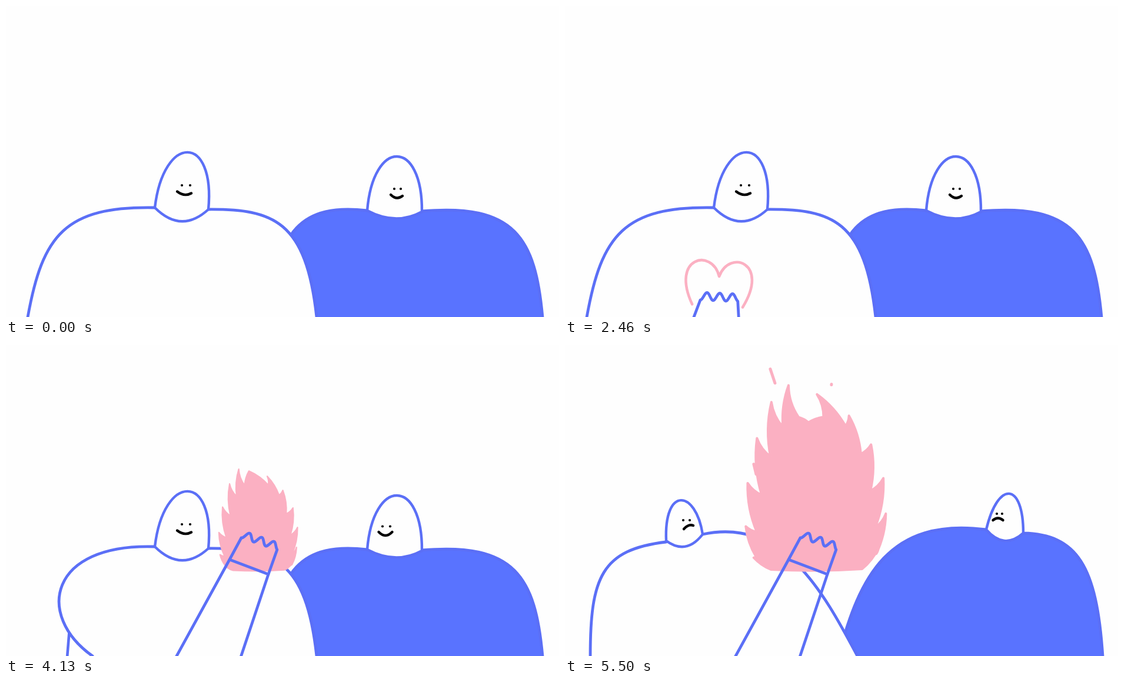
An HTML page with a canvas for the animation above (5540 ms loop, 940 by 529 pixels).

```html
<!DOCTYPE html>
<html lang="en">
<head>
<meta charset="utf-8">
<title>Heart on fire</title>
<style>
html, body { margin: 0; width: 100%; height: 100%; overflow: hidden; background: #fefefe; }
canvas { display: block; }
</style>
</head>
<body>
<canvas id="stage" width="940" height="529"></canvas>
<script>
const ctx = document.getElementById('stage').getContext('2d');
const LOOP = 5540, BLUE = '#5973ff', INK = '#5b6ff6', PINK = '#fbb0c2', WHITE = '#fefefe';

// body: two cubics, one per shoulder
// head: dome cubic from neck to neck, then the chin control point
// face: eyes x, y, half gap; mouth x, y, half width, slope, bend
const left = {
  rest: {
    body: [37,529, 62,390, 100,340, 253,343, 343,346, 455,345, 510,365, 528,529],
    head: [253,343, 268,217, 356,217, 344,346, 298,388],
    face: [306,305, 7, 303,317, 12, 1.5, 8]
  },
  recoil: {
    body: [50,529, 48,400, 58,355, 178,337, 241,326, 375,295, 440,420, 500,529],
    head: [178,336, 175,240, 230,246, 241,327, 212,360],
    face: [213.5,300.5, 5.5, 218,310, 8, -2, 4]
  },
  sad: {
    body: [43,529, 43,395, 62,348, 172,335, 234,322, 370,293, 438,418, 497,529],
    head: [172,333, 168,240, 222,246, 234,322, 206,358],
    face: [206.5,298, 5.5, 210,310, 8, -3, -6]
  }
};
const right = {
  rest: {
    body: [455,529, 455,380, 505,335, 614,348, 707,349, 865,335, 900,395, 912,529],
    head: [614,348, 624,225, 708,225, 707,350, 663,374],
    face: [665.5,311, 5.5, 664,322, 10, 1, 9]
  },
  recoil: {
    body: [465,529, 500,400, 545,305, 703,320, 770,321, 865,322, 900,370, 912,529],
    head: [703,318, 718,229, 767,230, 770,320, 737,345],
    face: [725.5,289, 5.5, 722.5,299.5, 9.5, 0.5, 0]
  },
  sad: {
    body: [465,529, 500,395, 550,292, 716,314, 779,320, 870,322, 904,375, 914,529],
    head: [716,314, 736,230, 779,233, 779,320, 746,349],
    face: [738.5,287, 4.5, 736,298, 8.5, 0, -7]
  }
};
const lookLeft = [646.5,308.5, 6.5, 645,318, 11.5, 0, 12];
const restOf = left.rest.body.slice(6);
const reaching = [62,529, 82,410, 130,358, ...restOf];
const offering = [147,529, 50,460, 72,337, ...restOf];

// Base, wrist and palm on the left, the same on the right in reverse, finger height
const arm = {
  grip: [195,640, 213,545, 230,500, 295,503, 296,545, 302,640, 13],
  inside: [200,640, 216,533, 240,455, 306,456, 298,533, 300,640, 6],
  offer: [284,540, 380,365, 400,328, 462,349, 446,390, 396,540, 12]
};
arm.low = arm.grip.map((v, i) => i % 2 ? v + 80 : v);

// Cubic rails that flame tongues climb: left, right
const tipRails = [[335,375, 267,344, 335,30, 395,72], [520,373, 579,268, 537,110, 395,72]];
const valleyRails = [[327,368, 314,359, 349,66, 412,132], [528,366, 534,343, 517,67, 416,132]];

const clamp = v => Math.max(0, Math.min(1, v));
const mix = (a, b, p) => a.map((v, i) => v + (b[i] - v) * p);
const span = (t, a, b) => clamp((t - a) / (b - a));
const ease = p => (1 - Math.cos(Math.PI * p)) / 2;

// Pose at time t from pairs time, pose
function track(t, ...keys) {
  let i = 0;
  while (i + 4 < keys.length && t >= keys[i + 2]) i += 2;
  return mix(keys[i + 1], keys[i + 3], ease(span(t, keys[i], keys[i + 2])));
}

function stroke(color, width) {
  ctx.strokeStyle = color;
  ctx.lineWidth = width;
  ctx.stroke();
}

function line(color, width, x, y, ...rest) {
  ctx.beginPath();
  ctx.moveTo(x, y);
  for (let i = 0; i < rest.length; i += 2) ctx.lineTo(rest[i], rest[i + 1]);
  stroke(color, width);
}

function body(p, fill) {
  ctx.beginPath();
  ctx.moveTo(p[0], p[1]);
  ctx.bezierCurveTo(...p.slice(2, 8));
  ctx.lineTo(p[8], p[9]);
  ctx.bezierCurveTo(...p.slice(10));
  ctx.fillStyle = fill;
  ctx.fill();
  stroke(INK, 4.8);
}

function head(p) {
  ctx.beginPath();
  ctx.moveTo(p[0], p[1]);
  ctx.bezierCurveTo(...p.slice(2, 8));
  ctx.quadraticCurveTo(p[8], p[9], p[0], p[1]);
  ctx.closePath();
  ctx.fillStyle = WHITE;
  ctx.fill();
  stroke(INK, 4.4);
}

function face([x, y, gap, mx, my, half, slope, bend]) {
  ctx.fillStyle = '#000';
  for (const side of [-1, 1]) {
    ctx.beginPath();
    ctx.arc(x + side * gap, y, 2.1, 0, 7);
    ctx.fill();
  }
  ctx.beginPath();
  ctx.moveTo(mx - half, my - slope);
  ctx.quadraticCurveTo(mx, my + bend, mx + half, my + slope);
  stroke('#000', 4.4);
}

function hand(p) {
  const [x1, y1, x2, y2] = p.slice(4, 8), size = Math.hypot(x2 - x1, y2 - y1);
  const fingers = [];
  for (let q = 0; q <= 1; q += 1 / 48) {
    const rise = p[12] * (1 - Math.cos(6 * Math.PI * q)) / 2 / size;
    fingers.push(x1 + (x2 - x1) * q + (y2 - y1) * rise, y1 + (y2 - y1) * q - (x2 - x1) * rise);
  }
  line(INK, 4.8, ...p.slice(0, 4), ...fingers, ...p.slice(8, 12));
  line(INK, 4.6, p[2], p[3], p[8], p[9]);
}

function rip() {
  ctx.beginPath();
  ctx.moveTo(240, 442);
  ctx.quadraticCurveTo(256, 455, 276, 438);
  ctx.quadraticCurveTo(286, 455, 308, 448);
  stroke(INK, 4);
}

function heart(t) {
  const move = ease(span(t, 2450, 3360)), size = ease(span(t, 1330, 1660));
  ctx.save();
  ctx.translate(262 + 176 * move, 460 + 35 * (1 - size) - 158 * move);
  ctx.rotate(0.06 + 0.2 * move);
  ctx.scale(size, size);
  ctx.beginPath();
  for (const side of [-1, 1]) {
    ctx.moveTo(0, 0);
    ctx.bezierCurveTo(15 * side, -48, 85 * side, -28, 43 * side, 50);
  }
  stroke(PINK, 4.6);
  ctx.restore();
}

function rail(p, t) {
  const s = 1 - t, w = [s * s * s, 3 * s * s * t, 3 * s * t * t, t * t * t];
  return [0, 1].map(axis => w.reduce((sum, k, i) => sum + k * p[2 * i + axis], 0));
}

function spark(p, start, from, to) {
  line(PINK, 5, ...mix(from, to, (p % 1 - start) * 2));
}

function flame(t) {
  const size = span(t, 3850, 4350);
  const u = ((t - 4500) / 400 + 10) % 1;
  const side = n => {
    const list = [];
    for (let k = 0; k < 6; k++) {
      list.push(rail(tipRails[n], (u + k) / 6), rail(valleyRails[n], (u + k) / 6));
    }
    return list;
  };
  // The topmost tongue sinks into a notch, then the next pair closes over it
  const apex = mix([395, 72], [414, 132], 1 - Math.abs(2 * u - 1));
  const edge = [[350, 382], ...side(0), apex, ...side(1).reverse(), [505, 381]];

  ctx.save();
  ctx.translate(432, 385);
  ctx.scale(size, size);
  ctx.translate(-432, -385);
  ctx.beginPath();
  ctx.moveTo(...edge[0]);
  for (let i = 1; i < edge.length; i++) {
    // Outer edges bulge, inner edges hollow
    const [x, y] = edge[i - 1], [x2, y2] = edge[i];
    const outer = (i % 2 === 1) === (i < edge.length / 2);
    const bow = outer ? 0.11 : -0.15;
    ctx.quadraticCurveTo((x + x2) / 2 + (y2 - y) * bow, (y + y2) / 2 - (x2 - x) * bow, x2, y2);
  }
  ctx.quadraticCurveTo(430, 386, ...edge[0]);
  ctx.fillStyle = PINK;
  ctx.fill();
  stroke(PINK, 4);
  if (t > 4300) {
    spark(u + 0.6, 0.1, [321,203, 325,220], [306,138, 313,156]);
    spark(u + 0.9, 0.4, [349,41, 357,65], [340,15, 340,16]);
    spark(u + 0.3, 0.3, [464,94, 475,123], [453,67, 453,68]);
  }
  ctx.restore();
}

function draw(t) {
  ctx.fillStyle = WHITE;
  ctx.fillRect(0, 0, 940, 529);
  ctx.lineCap = ctx.lineJoin = 'round';

  const flee = (who, part, from = who.rest[part]) =>
    track(t, 4150, from, 4480, who.recoil[part], 4700, who.sad[part]);
  body(flee(right, 'body'), BLUE);
  head(flee(right, 'head'));
  face(flee(right, 'face', track(t, 3500, right.rest.face, 3720, lookLeft)));

  line(INK, 4.6, 109, 470, 104, 531);
  const rest = left.rest.body;
  const pose = track(t, 580, rest, 860, reaching, 1420, reaching, 1980, rest, 2450, rest, 3360, offering);
  body(flee(left, 'body', pose), WHITE);
  head(flee(left, 'head'));
  face(flee(left, 'face'));

  if (t > 1330 && t < 4000) heart(t);
  if (t > 3850) flame(t);
  hand(track(t, 600, arm.low, 860, arm.inside, 1300, arm.inside, 1800, arm.grip, 2450, arm.grip, 3360, arm.offer));
  if (t > 820 && t < 1380) rip();
}

const begin = performance.now();
function tick() {
  draw((performance.now() - begin) % LOOP);
  requestAnimationFrame(tick);
}
tick();
</script>
</body>
</html>
```
